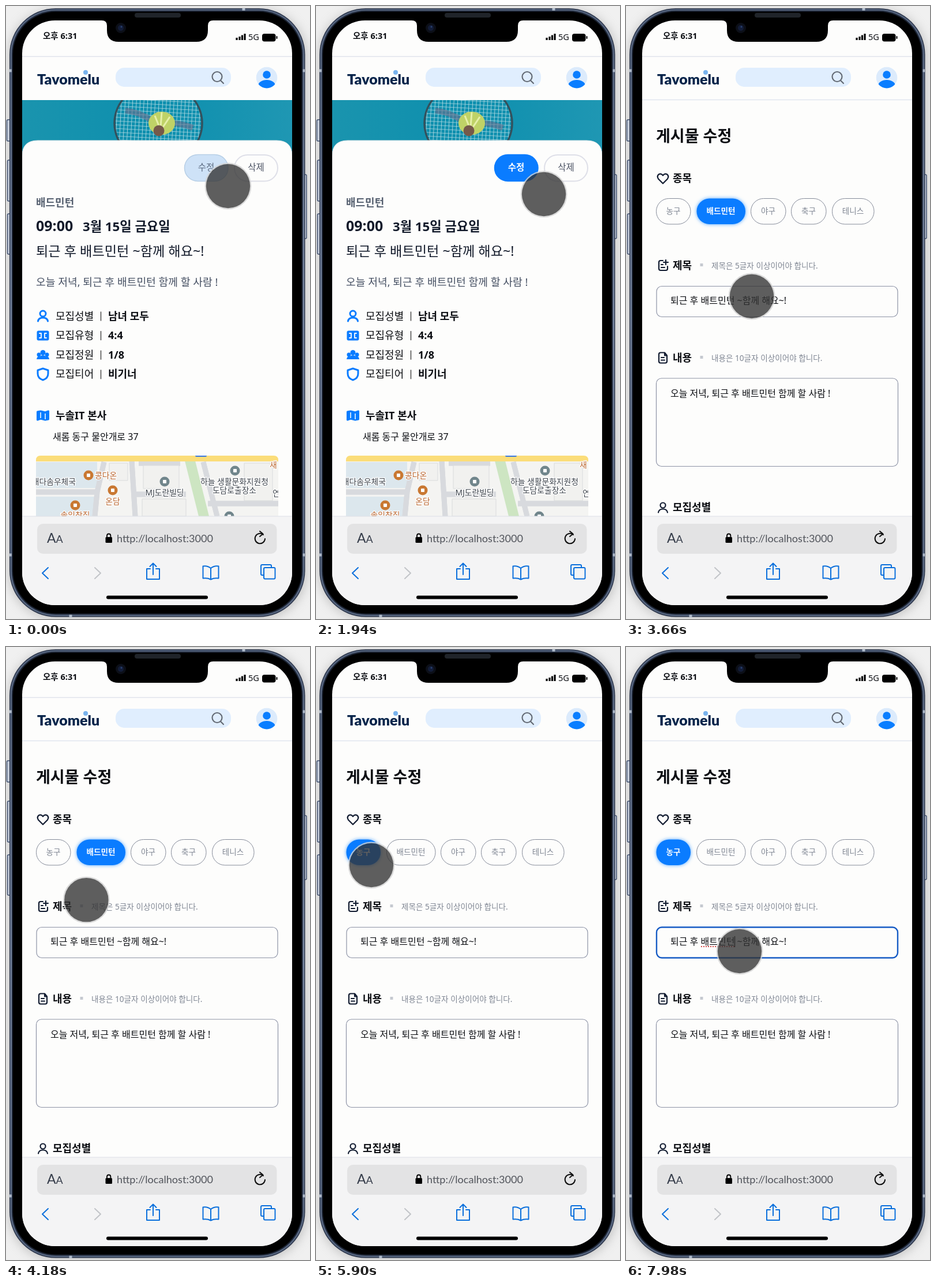
These frames come from a looping animation (527x1062 px, 8000 ms). An HTML page:

```html
<!DOCTYPE html>
<html lang="ko">
<head>
<meta charset="utf-8">
<title>게시물 수정</title>
<style>
html, body { margin: 0; width: 100%; height: 100%; overflow: hidden; background: #e9e9e9; }
svg { display: block; width: 527px; height: 1062px; }
text { font: 18px "Noto Sans", "Noto Sans CJK KR", "Noto Sans CJK", sans-serif; white-space: pre; fill: #0b0d12; }
.b { font-weight: 700; }
.m { font-weight: 500; }
.c { text-anchor: middle; }
.s16 { font-size: 16px; }
.hint { font-size: 13.6px; fill: #7f8693; }
.lato { font-family: Lato, sans-serif; }
.map text { font-size: 13.8px; fill: #3c434b; stroke: #fff; stroke-width: 2.5px; paint-order: stroke; }
.map .food { fill: #b8622a; }
.line { fill: none; stroke-width: 2.2; stroke-linecap: round; stroke-linejoin: round; }
.blue { stroke: #0a6fdc; }
.dark { stroke: #111b30; }
</style>
</head>
<body>
<svg viewBox="0 0 527 1062">
  <defs>
    <clipPath id="screen"><rect x="28" y="25" width="468" height="1013" rx="57"/></clipPath>
    <clipPath id="mapBox"><path d="M52 884V787q0-8 8-8H464q8 0 8 8V884z"/></clipPath>
    <clipPath id="photo"><rect x="28" y="163" width="468" height="105"/></clipPath>
    <clipPath id="avatar"><circle cx="452" cy="124" r="18.5"/></clipPath>
    <linearGradient id="court"><stop stop-color="#1a94ae"/><stop offset=".5" stop-color="#0d8fae"/><stop offset="1" stop-color="#1f97b3"/></linearGradient>
    <linearGradient id="rim" x2="0" y2="1"><stop stop-color="#55647e"/><stop offset=".5" stop-color="#7c8ba6"/><stop offset="1" stop-color="#55647e"/></linearGradient>
    <pattern id="net" width="6.5" height="6.5" patternUnits="userSpaceOnUse" patternTransform="rotate(3)"><path d="M0 0H7M0 0V7" stroke="#b9dde4" stroke-width="1.6"/></pattern>
    <filter id="blur" x="-30%" y="-30%" width="160%" height="160%"><feGaussianBlur stdDeviation="3"/></filter>
    <filter id="far"><feGaussianBlur stdDeviation="9"/></filter>
  </defs>

  <!-- phone body -->
  <rect width="527" height="1062" fill="#f0f0f0"/>
  <rect x="4" y="6" width="518" height="1056" rx="82" fill="#a6a6a6" opacity=".6" filter="url(#far)"/>
  <g fill="#c3cbd9" stroke="#40506f" stroke-width="1.5">
    <rect x="1.5" y="197" width="7" height="37" rx="2"/>
    <rect x="2.5" y="267" width="6" height="71" rx="2"/>
    <rect x="2.5" y="360" width="6" height="70" rx="2"/>
    <rect x="515" y="292" width="6" height="111" rx="2"/>
  </g>
  <rect x="6" y="4" width="512.5" height="1054.5" rx="80" fill="#2b354a"/>
  <rect x="7.5" y="5.5" width="509.5" height="1051.5" rx="78.5" fill="url(#rim)"/>
  <path d="M6 112h6M512 112h6M6 951h6M512 951h6M412 4v6M112 1053v6" stroke="#aeb9ca" stroke-width="5"/>
  <rect x="10" y="8" width="504.5" height="1046.500" rx="76" fill="#1c2434"/>
  <rect x="12" y="10" width="500.5" height="1042.5" rx="74"/>
  <rect x="223" y="12" width="80" height="8" rx="4" fill="#20242a"/>

  <g clip-path="url(#screen)">
    <rect x="28" y="25" width="468" height="1013" fill="#fdfdfc"/>
    <path d="M28 87.5H496" stroke="#dfe2eb" stroke-width="1.5"/>
    <path d="M166 25q9 0 9 9v8q0 20 20 20H330q20 0 20-20v-8q0-9 9-9z"/>
    <circle cx="199" cy="38" r="9" fill="#0c0f18"/><circle cx="199" cy="38" r="5" fill="#121c38"/><circle cx="200" cy="36" r="1.5" fill="#2a4272"/>
    <text x="64" y="57" class="b" style="font-size:14.5px">오후 6:31</text>
    <path d="M400 59v-4M405 59v-6M409.5 59v-8.5M414 59v-11" stroke="#000" stroke-width="3.2"/>
    <text x="420" y="59" class="m" style="font-size:14.5px">5G</text>
    <rect x="444" y="48" width="23.5" height="13.5" rx="4"/><rect x="468.5" y="52" width="2" height="5" rx="1"/>

    <!-- site header -->
    <text x="54" y="136" class="lato" style="font-size:25px;font-weight:900;fill:#08254b">Tavomelu</text>
    <circle cx="138" cy="115" r="4" fill="#79b3ed"/>
    <rect x="190" y="107" width="200" height="33" rx="15" fill="#e0eefe"/>
    <g class="line" stroke="#656c76"><circle cx="366" cy="122.5" r="8.5"/><path d="M372 129l5 5"/></g>
    <g clip-path="url(#avatar)"><circle cx="452" cy="124" r="18.5" fill="#dcebfc"/><circle cx="452" cy="119" r="6.8" fill="#0a7eff"/><ellipse cx="452" cy="138" rx="15" ry="10" fill="#0a7eff"/></g>

    <!-- post -->
    <g id="post">
      <g clip-path="url(#photo)">
        <rect x="28" y="163" width="468" height="105" fill="url(#court)"/>
        <ellipse cx="264" cy="203" rx="76" ry="70" fill="url(#net)" stroke="#34505c" stroke-width="3.5"/>
        <path d="M207 181q32 4 55 25q30-8 62 5" stroke="#68718e" stroke-width="10" fill="none" opacity=".6"/>
        <ellipse cx="270" cy="203" rx="23" ry="20" fill="#bfd267"/>
        <path d="M258 190l8 20M270 184l-2 26M284 192l-12 18" stroke="#e6efa9" stroke-width="3"/>
        <circle cx="265" cy="216" r="9.5" fill="#75594a"/>
      </g>
      <path d="M28 260q0-27 27-27H469q27 0 27 27V900H28z" fill="#fdfdfc" stroke="#e2e7ea"/>
      <rect id="edit" x="309.5" y="257.5" width="75.5" height="46" rx="23" stroke-width="1.5"/>
      <text id="editText" x="347" y="285" class="c" style="font-size:15.5px">수정</text>
      <rect x="396" y="258" width="75" height="45.5" rx="22.7" fill="#fdfdfc" stroke="#dedfe8" stroke-width="2"/>
      <text x="433.5" y="285" class="c m" style="font-size:15.5px;fill:#4b5263">삭제</text>
      <text x="52" y="347" class="b" style="fill:#566070">배드민턴</text>
      <text x="52" y="390" class="b" style="font-size:25px;fill:#121a2a">09:00</text>
      <text x="133" y="390" class="b" style="font-size:22.2px;fill:#121a2a">3월 15일 금요일</text>
      <text x="52" y="433" class="m" style="font-size:23.2px;fill:#121a2a">퇴근 후 배트민턴 ~함께 해요~!</text>
      <text x="52" y="484.5" style="font-size:18.2px;fill:#465063">오늘 저녁, 퇴근 후 배트민턴 함께 할 사람 !</text>
      <g id="rows"></g>
      <g class="line" stroke="#0a7cff" style="stroke-width:3">
        <circle cx="64" cy="533" r="5"/><path d="M55.5 546q1-6 8.5-6t8.5 6"/>
        <path d="M64 628l9 3v6q0 8-9 11q-9-3-9-11v-6z"/>
        <path d="M54.5 703l5.500-1 8 2 5.500-2v14l-5.500 1-8-2-5.500 2z" fill="#0a7cff"/>
      </g>
      <path d="M60 704v10M68 706v10" stroke="#fff" stroke-width="1.5"/>
      <g fill="#0a7cff">
        <rect x="53.5" y="562.5" width="21" height="17" rx="3"/>
        <circle cx="64" cy="600.5" r="4.5"/><circle cx="57" cy="604" r="3.5"/><circle cx="71" cy="604" r="3.5"/>
        <path d="M53 612q1-6 6-5q5-4 10 0q5-1 6 5z"/>
      </g>
      <path d="M58 567h3v8h-3M70 567h-3v8h3" class="line" stroke="#fff" style="stroke-width:1.8"/>
      <text x="86" y="716" class="b">누솔IT 본사</text>
      <text x="81" y="752" class="s16">새롬 동구 물안개로 37</text>

      <g class="map" clip-path="url(#mapBox)">
        <rect x="52" y="779" width="420" height="105" fill="#f4f4f2"/>
        <path d="M52 790H158V835H52zM52 850H155V884H52z" fill="#dce7ed"/>
        <path d="M310 788H328L352 884H334z" fill="#cde5c2"/>
        <path id="roads" d="M52 842H158L170 790M158 842L154 884M218 789L224 884M226 846H312M230 792H302M342 790L366 884M350 862H472" fill="none" stroke="#d8dade" stroke-width="9"/>
        <use href="#roads" style="stroke:#fff;stroke-width:7"/>
        <path d="M238 796h62v40h-62zM236 854h76v30h-76zM179 792h32v30h-32zM413 792h49v65h-49z" fill="#f1f1ef" stroke="#d9dbdc"/>
        <rect x="52" y="779" width="420" height="10" fill="#fbdd79"/><rect x="328" y="776" width="20" height="5" rx="2" fill="#3978df"/>
        <g id="pins"></g>
        <text x="121" y="829" text-anchor="end">새다솜우체국</text>
        <text x="154" y="818" class="food">콩다온</text>
        <text x="185" y="863" class="food c">온담</text>
        <text x="120" y="887" class="food c">솔잎찻집</text>
        <text x="275" y="848" class="c">MJ도란빌딩</text>
        <text x="396" y="829" class="c">하늘 생활문화지원청</text>
        <text x="396" y="844" class="c">도담로출장소</text>
        <text x="457" y="800" class="food">새</text>
        <text x="462" y="849">연</text>
      </g>
    </g>

    <!-- edit form -->
    <g id="form">
      <path d="M28 162.5H496" stroke="#e0e5f0" stroke-width="1.5"/>
      <text x="52" y="235" class="b" style="font-size:27px">게시물 수정</text>
      <g class="line dark">
        <path d="M64 307.5l-8-8q-3-5 1-8q4-2 7 2q3-4 7-2q4 3 1 8z"/>
        <path d="M64 441h-4q-3 0-3 3v11q0 3 3 3h9q3 0 3-3v-4M69 440v8M65 444h8M61 448h3M61 453h6"/>
        <path d="M67 600.5h-7q-3 0-3 3v12q0 3 3 3h8q3 0 3-3v-10zl0 5h4M61 609h5M61 613.5h6"/>
        <circle cx="64" cy="865" r="4.5"/><path d="M56 877.5q1-6 8-6t8 6"/>
      </g>
      <text x="81" y="304.5" class="b">종목</text>
      <g id="pills"></g>
      <text x="81" y="455.5" class="b">제목</text>
      <text x="81" y="615.5" class="b">내용</text>
      <text x="81" y="875" class="b">모집성별</text>
      <path d="M128.5 446h5v5h-5zM128.5 606h5v5h-5z" fill="#c5c9d0"/>
      <text x="148" y="454.5" class="hint">제목은 5글자 이상이어야 합니다.</text>
      <text x="148" y="614.5" class="hint">내용은 10글자 이상이어야 합니다.</text>
      <rect id="field" x="53" y="485.5" width="418" height="53" rx="9" fill="none"/>
      <rect x="52.5" y="645" width="419" height="152.5" rx="9" fill="none" stroke="#8d93a6" stroke-width="1.2"/>
      <text x="77" y="515.5" class="s16">퇴근 후 배트민턴 ~함께 해요~!</text>
      <text x="77" y="676.5" class="s16">오늘 저녁, 퇴근 후 배트민턴 함께 할 사람 !</text>
      <g id="typing">
        <path d="M130 519H188" stroke="#d34b4b" stroke-width="2" stroke-dasharray="2 2"/>
        <path d="M188.5 501V520" stroke="#111" stroke-width="1.3"/>
      </g>
    </g>

    <!-- browser bar -->
    <rect x="28" y="884" width="468" height="154" fill="#f4f4f5"/>
    <path d="M28 884H496" stroke="#dcdfe6"/>
    <rect x="54" y="897" width="415.5" height="52" rx="10" fill="#e3e3e4"/>
    <text x="71" y="930" class="lato" style="font-size:23px;fill:#343b49">A<tspan style="font-size:18px">A</tspan></text>
    <rect x="172.5" y="920" width="11.5" height="10" rx="1.5"/>
    <path d="M175 921v-3q0-3.5 3.2-3.5t3.2 3.5v3" class="line" stroke="#000" style="stroke-width:1.8"/>
    <text x="192" y="929" class="lato" style="font-size:18.1px;fill:#51545b">http://localhost:3000</text>
    <path d="M446 916A8.700 8.700 0 1 0 449 923M440 910l5.500 4.500-5.500 4.500" class="line" stroke="#111" style="stroke-width:2"/>
    <g class="line blue" style="stroke-width:2">
      <path d="M73 973l-10 9.5 10 9.5"/>
      <path d="M154 973l10 9.5-10 9.5" stroke="#c2c4c8"/>
      <path d="M250 975h-6v18h22v-18h-6M255 985v-19M249.5 971l5.5-5.5 5.5 5.5"/>
      <path d="M355 974q-6-5-13.5-3.500v21q8-1 13.5 2q5.5-3 13.5-2v-21q-7.5-1.5-13.5 3.5v19"/>
      <path d="M447 986h-3q-2 0-2-2v-14q0-2 2-2h14q2 0 2 2v3"/><rect x="447" y="973" width="19.5" height="19.5" rx="2"/>
    </g>
    <rect x="174" y="1021.5" width="176" height="6" rx="3"/>
  </g>

  <g id="touch"><circle r="39.2" fill="none" stroke="#d2d2d2" stroke-width="2.4" opacity=".8"/><circle r="38.2" fill="#333" opacity=".78"/></g>
  <g id="hand">
    <path d="M-1 1q4-3 6 1l4 10 3-1 3 1 3-1 3 2 3 0q4 1 3 6l-1 11-3 3v6H6v-5L-8 23q-2-4 2-5l5 3L-3 5q-1-3 2-4z" transform="translate(2 4)" fill="#888" opacity=".5" filter="url(#blur)"/>
    <path d="M-1 1q4-3 6 1l4 10 3-1 3 1 3-1 3 2 3 0q4 1 3 6l-1 11-3 3v6H6v-5L-8 23q-2-4 2-5l5 3L-3 5q-1-3 2-4z" stroke="#fff" stroke-width="2"/>
    <path d="M10 25v7M14.5 25v7M19 25v7" stroke="#fff" stroke-width="1.5"/>
  </g>
</svg>
<script>
const $ = id => document.getElementById(id);
const show = (id, on) => $(id).style.display = on ? '' : 'none';
const mix = (a, b, k) => a + (b - a) * k;
const rgb = (a, b, k) => `rgb(${a.map((v, i) => mix(v, b[i], k))})`;

const rows = [['성별', '남녀 모두'], ['유형', '4:4'], ['정원', '1/8'], ['티어', '비기너']];
$('rows').innerHTML = rows.map(([key, value], i) => {
  const y = 543.5 + i * 33.6;
  return `<text x="86" y="${y}">모집${key}</text><path d="M164.5 ${y - 14}v16" stroke="#333" stroke-width="1.3"/>
    <text x="177" y="${y}" class="b">${value}</text>`;
}).join('');

const pins = [[143, 813, 1], [185, 839, 1], [120, 865, 1], [275, 824], [397, 805], [387, 884]];
$('pins').innerHTML = pins.map(([x, y, food]) =>
  `<circle cx="${x}" cy="${y}" r="8.5" fill="${food ? '#c97832' : '#71868c'}"/>
   <rect x="${x - 3}" y="${y - 3}" width="6" height="6" rx="1" fill="#fff"/>`).join('');

const sports = [['농구', 52, 60], ['배드민턴', 122, 85], ['야구', 216, 61], ['축구', 286, 61], ['테니스', 357, 73]];
function drawPills(active) {
  $('pills').innerHTML = sports.map(([name, x, w], i) => {
    const box = `x="${x + .5}" y="333.5" width="${w - .5}" height="44.5" rx="22"`;
    const on = i === active;
    return (on ? `<rect ${box} fill="#4ba2ff" filter="url(#blur)"/>` : '') +
      `<rect ${box} fill="${on ? '#0a7cff' : '#fdfdfc'}" stroke="${on ? 'none' : '#858b99'}"/>
      <text x="${x + w / 2}" y="360" class="c hint ${on ? 'b' : ''}" ${on ? 'style="fill:#fff"' : ''}>${name}</text>`;
  }).join('');
}

// pointer path: time, x, y
const path = [[0, 385, 312], [900, 395, 326], [2600, 395, 326], [3500, 218, 503], [3750, 218, 503],
  [4600, 64, 376], [4850, 64, 376], [5300, 96, 378], [6050, 96, 378], [6850, 209, 538],
  [7000, 209, 538], [7400, 197, 527], [8000, 197, 527]];
function pointer(t) {
  const i = path.findIndex(p => p[0] > t);
  const [a, b] = [path[i - 1], path[i]];
  const k = (t - a[0]) / (b[0] - a[0]), e = k * k * (3 - 2 * k);
  return `translate(${mix(a[1], b[1], e)} ${mix(a[2], b[2], e)})`;
}

let selected = -1;
function draw(now) {
  const t = now % 8000;
  const onForm = t >= 2720, focused = t >= 7500, hand = t >= 4450 && t < 5000;
  show('post', !onForm);
  show('form', onForm);

  const k = Math.min(1, t / 300);
  $('edit').style.fill = rgb([207, 226, 247], [10, 124, 255], k);
  $('edit').style.stroke = rgb([184, 207, 230], [10, 124, 255], k);
  $('editText').style.fill = rgb([92, 108, 130], [255, 255, 255], k);
  $('editText').style.fontWeight = k < .5 ? 500 : 700;

  const choice = t < 5350 ? 1 : 0;
  if (choice !== selected) drawPills(selected = choice);
  $('field').style.stroke = focused ? '#175cc5' : '#8d93a6';
  $('field').style.strokeWidth = focused ? 2.4 : 1.2;
  show('typing', focused);

  $('touch').setAttribute('transform', pointer(t));
  $('hand').setAttribute('transform', pointer(t));
  show('touch', !hand);
  show('hand', hand);
}
const start = performance.now();
function tick() {
  draw(performance.now() - start);
  requestAnimationFrame(tick);
}
tick();
</script>
</body>
</html>
```
